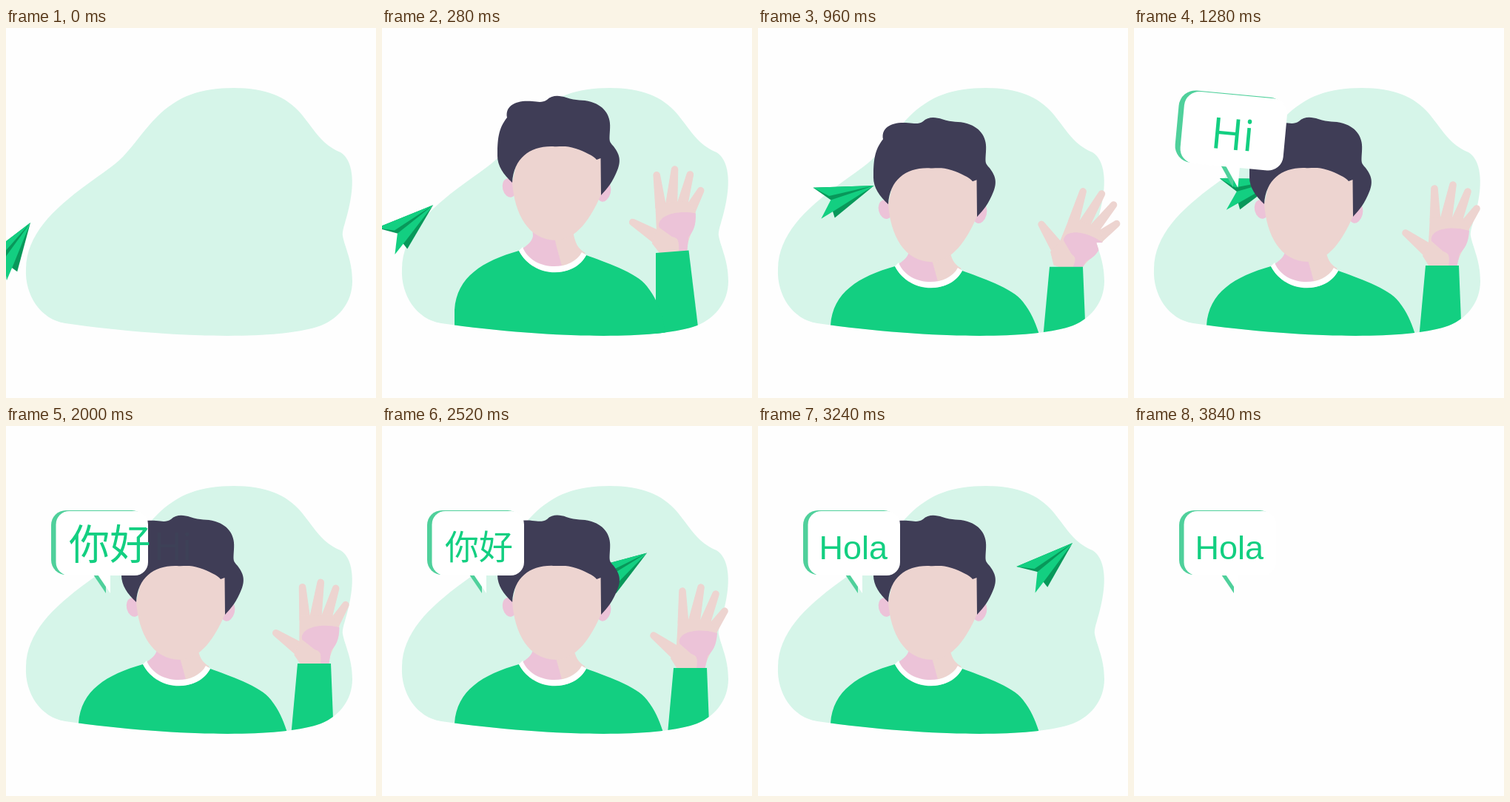
These frames come from a looping animation (500x500 px, 3880 ms). An HTML page with a canvas:

```html
<!DOCTYPE html>
<html lang="en">
<head>
<meta charset="utf-8">
<title>Hello</title>
<style>
html, body { margin: 0; width: 100%; height: 100%; overflow: hidden; background: #fefefe; }
canvas { display: block; width: 500px; height: 500px; }
</style>
</head>
<body>
<canvas id="stage" width="500" height="500"></canvas>
<script>
const ctx = document.getElementById('stage').getContext('2d');
const LOOP = 3880, STEP = 40, END = 3840;
const GREEN = '#13cf81', DARK = '#08985a', MINT = '#4fd09b';
const SKIN = '#edd4d0', PINK = '#ecc3d8', HAIR = '#3f3d56';

const blob = new Path2D(`M27 325C28 280 62 246 110 211C130 196 145 187 158 174
  C174 157 186 138 205 119C233 92 262 81 308 81C351 81 379 93 398 115
  C417 138 427 158 452 168C470 179 470 211 465 235C460 261 454 272 455 281
  C458 297 468 314 468 342C468 371 449 395 420 404C362 422 220 419 80 399
  C47 394 25 361 27 325Z`);
// Lets the figure rise above the blob but not below its lower edge.
const floor = new Path2D(blob);
floor.rect(0, 0, 500, 290);

const hair = new Path2D(`M176 239C164 228 156 216 156 203C156 181 157 166 169 151
  C166 135 181 127 203 129C212 130 217 131 223 127C230 120 240 121 249 124
  C263 129 270 126 283 130C302 136 310 150 308 168C307 184 307 183 313 190
  C323 203 323 212 316 227C309 243 301 250 296 256L295.500 206L290 208
  C286 203 274 197 262 193C247 188 240 191 231 190C201 189 178 205 176 239Z`);
const face = new Path2D('M176 239C179 280 197 317 236 317C263 315 282 288 296 255L297 195L235 184L185 198Z');
const neck = new Path2D('M203 290L204 302C203 310 195 315 189 320L205 344L240 347L260 340L240 290Z');
const neckLight = new Path2D('M232 300L236 317L244 346L275 325C264 319 261 311 258 296Z');
const shirt = new Path2D(`M98 402C101 357 136 336 185 322C205 360 257 360 276 328
  C300 337 344 351 358 370C369 384 374 396 379 411L390 470L98 470Z`);
const collar = new Path2D('M190 317C203 350 256 351 270 324L276 328C260 360 204 359 185 322Z');
const back = new Path2D('M398 290L400 255L444 256L453 272L450 287C446 300 438 307 436 324L400 324L390 308Z');
const palm = new Path2D('M402 288C399 272 427 266 453 274C452 291 447 298 440 305L436 324L425 324C427 307 426 305 418 302Z');

const easeOut = u => 1 - (1 - u) ** 2;
const smooth = u => u * u * (3 - 2 * u);
const mix = (a, b, k) => a + (b - a) * k;
const part = (t, a, b) => Math.min(1, Math.max(0, (t - a) / (b - a)));
const ramp = (t, a, b) => smooth(part(t, a, b));
const bump = (t, a, b) => Math.sin(Math.PI * part(t, a, b)) ** 2;

function fill(path, color) {
  ctx.fillStyle = color;
  ctx.fill(path);
}

function poly(color, ...pts) {
  ctx.fillStyle = color;
  ctx.beginPath();
  for (let i = 0; i < pts.length; i += 2) ctx.lineTo(pts[i], pts[i + 1]);
  ctx.fill();
}

function oval(x, y, rx, ry, tilt) {
  ctx.fillStyle = PINK;
  ctx.beginPath();
  ctx.ellipse(x, y, rx, ry, tilt, 0, 7);
  ctx.fill();
}

// Moves, turns and scales a drawing about the pivot (px, py).
function pose({ x = 0, y = 0, deg = 0, scale = 1, px = 0, py = 0 }, draw) {
  ctx.save();
  ctx.translate(x + px, y + py);
  ctx.rotate(deg * Math.PI / 180);
  ctx.scale(scale, scale);
  ctx.translate(-px, -py);
  draw();
  ctx.restore();
}

function plane(t) {
  // The flight slows to a stop between 2840 and 3240.
  const s = Math.min(t, 3240) - 200 * part(t, 2840, 3240) ** 2;
  const x = 33 + 0.129 * s;
  const y = 263 - 26 * (1 - Math.exp(-s / 280)) - 0.026 * s;
  const deg = 14.5 * Math.sin(Math.PI * s / 2300) - 27 * Math.exp(-s / 600);
  pose({ x, y, deg }, () => {
    poly(DARK, 0, 0, -81, 15, -57, 27, -51, 30);
    poly(GREEN, 0, 0, -81, 15, -58, 23);
    poly(DARK, 0, 0, -51, 41, -46, 51);
    poly(GREEN, 0, 0, -55, 28, -64, 55, -45, 39);
  });
}

// A tapered digit from its base to a round tip.
function finger(bx, by, tx, ty, r) {
  const a = Math.atan2(ty - by, tx - bx), q = Math.PI / 2;
  ctx.fillStyle = SKIN;
  ctx.beginPath();
  ctx.arc(bx, by, r, a + q, a - q);
  ctx.arc(tx, ty, 4.8, a - q, a + q);
  ctx.fill();
}

function hand() {
  finger(401, 303, 367, 277, 10);
  finger(407, 260, 406, 217, 7.5);
  finger(422, 257, 431, 212, 8);
  finger(436, 261, 451, 221, 7.5);
  finger(445, 270, 463, 244, 8);
  fill(back, SKIN);
  fill(palm, PINK);
}

function arm(t, hop) {
  const drop = 220 * part(t, 2480, 2720) ** 2;
  const low = 1 - ramp(t, 600, 1120);
  const deg = 8 * hop - 14 * low + 32 * bump(t, 600, 1120) - 14 * bump(t, 1920, 2440);
  const top = 321 + 8 * low;
  pose({ y: drop }, () => {
    pose({ x: -2 * low - 22 * hop, y: 9 * low - 29 * hop, deg, px: 417, py: 321 }, hand);
    poly(GREEN, mix(394, 370, hop), mix(top, 304, hop), mix(439, 414.500, hop), mix(top, 300.500, hop),
      mix(443, 429, hop), 420, mix(385, 370, hop), 420);
  });
}

function person(t) {
  const hidden = 330 * (1 - easeOut(part(t, 0, 240)));
  const hop = 1 - ramp(t, 280, 560);
  const lean = ramp(t, 2480, 2840) - ramp(t, 3040, 3240);
  ctx.save();
  ctx.clip(floor);
  ctx.translate(0, hidden);
  if (t < 2720) arm(t, hop);
  ctx.translate(0, -21 * hop);
  fill(neck, PINK);
  fill(neckLight, SKIN);
  fill(shirt, GREEN);
  fill(collar, '#fff');
  ctx.translate(2 * lean, -9 * hop - ramp(t, 600, 1120) - 3 * lean);
  oval(172, 246, 9, 13, -0.25);
  oval(300, 251, 9, 14, 0.25);
  fill(face, SKIN);
  fill(hair, HAIR);
  ctx.restore();
}

const words = [
  { text: 'Hi', from: 0, to: 1920, x: 103, y: 181, size: 52, font: '400 1px "Open Sans", sans-serif' },
  { text: '你好', from: 1920, to: 3040, x: 85, y: 180, size: 46, font: '300 1px "Noto Sans CJK SC", "Noto Sans CJK", sans-serif' },
  { text: 'Hola', from: 3040, to: LOOP, x: 82.500, y: 179.500, size: 45, font: '400 1px "Liberation Sans", Arial, sans-serif' }
];

// Each word slides in from the left, a fifth too large, and leaves to the right.
function word({ text, from, to, x, y, size, font }, t) {
  const enter = 1 - easeOut(part(t, from, from + 80));
  const leave = ramp(t, to, to + 90);
  if (t < from || leave === 1) return;
  const big = 1.2 - 0.2 * ramp(t, from + 80, from + 200);
  ctx.globalAlpha = (1 - 0.7 * enter) * (1 - leave);
  ctx.fillStyle = GREEN;
  ctx.font = font.replace('1px', size * big + 'px');
  ctx.fillText(text, x - 55 * enter + 100 * leave, y);
  ctx.globalAlpha = 1;
}

function card(color, x, y, w, h, r) {
  ctx.fillStyle = color;
  ctx.beginPath();
  ctx.roundRect(x, y, w, h, r);
  ctx.fill();
}

function bubble(t) {
  if (t < 1160) return;
  const rest = 1 - easeOut(part(t, 1160, 1600));
  const scale = mix(0.3, 1, easeOut(part(t, 1160, 1240))) * (1 + 0.23 * rest);
  pose({ x: 9 * rest, y: -37 * rest, deg: 10 * rest, scale, px: 127, py: 158 }, () => {
    card(MINT, 61, 114, 129, 87, 20);
    poly(MINT, 118, 201, 135, 201, 135, 226);
    card('#fff', 67.500, 115, 124.500, 87, 18);
    poly('#fff', 124, 201, 141, 201, 141, 226);
    words.forEach(w => word(w, t));
  });
}

function draw(t) {
  ctx.fillStyle = '#fefefe';
  ctx.fillRect(0, 0, 500, 500);
  if (t < END) {
    fill(blob, '#d6f5e9');
    plane(t);
    if (t > 0) person(t);
  }
  bubble(t);
}

const start = performance.now();
function tick() {
  const t = (performance.now() - start) % LOOP;
  draw(Math.floor(t / STEP) * STEP);
  requestAnimationFrame(tick);
}
tick();
</script>
</body>
</html>
```
